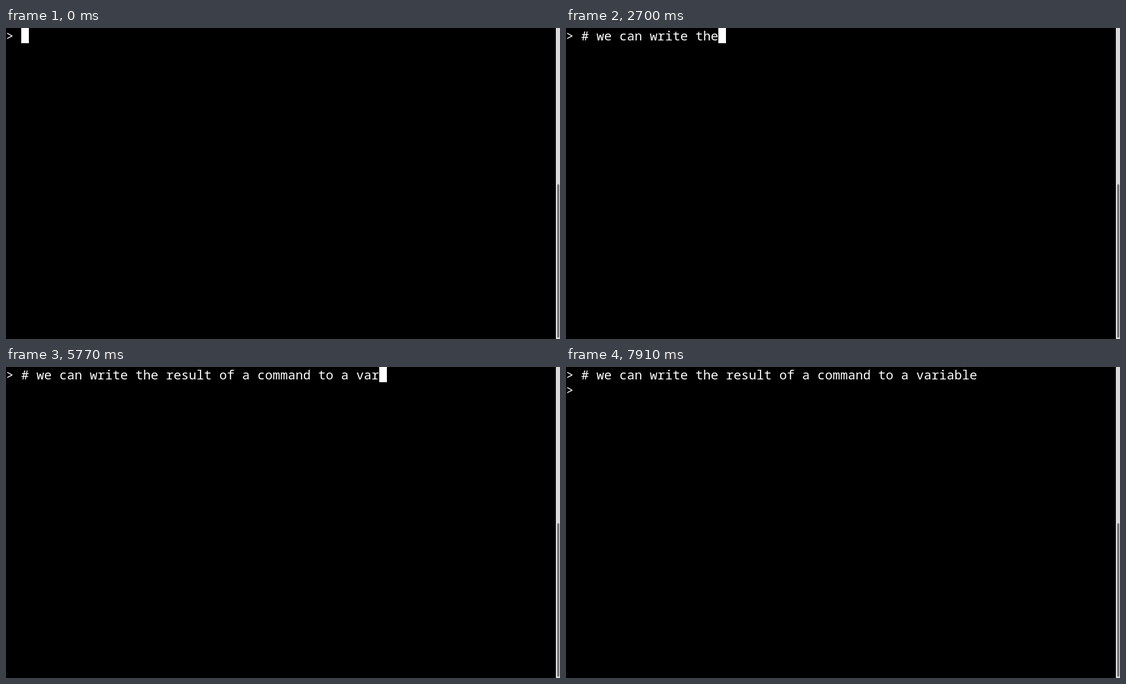
Recreate the animation shown at these times as an HTML page. Size 800 px wide and 450 px high, loop 8 s.

```html
<!DOCTYPE html>
<html lang="en">
<head>
<meta charset="utf-8">
<title>Terminal</title>
<style>
  html, body { margin: 0; width: 100%; height: 100%; overflow: hidden; background: #000; }
  #stage { position: relative; width: 800px; height: 450px; overflow: hidden; background: #000; }
  #screen {
    margin: 0; color: #fff;
    font: 18.333px/22px "Noto Sans Mono", "DejaVu Sans Mono", monospace;
    font-variant-ligatures: none;
  }
  #cursor { position: absolute; width: 11px; height: 22px; background: #fff; }
  #track { position: absolute; left: 794px; top: 0; width: 6px; height: 450px; background: #d9d8da; }
  #thumb { position: absolute; left: 2px; top: 226px; width: 3px; height: 222px; border-radius: 1.5px; background: #747476; }
</style>
</head>
<body>
<div id="stage">
  <pre id="screen"></pre>
  <div id="cursor"></div>
  <div id="track"><div id="thumb"></div></div>
</div>
<script>
  const LOOP = 8000, CELL = 11, ROW = 22;
  const PROMPT = "> ";
  const LINE = PROMPT + "# we can write the result of a command to a variable";
  const ENTER = 7210;
  const BLINK_OFF = [[6600, ENTER], [7860, LOOP]];

  // Typing pace: [time in ms, characters on the line]
  const PACE = [[600, 2], [1465, 11], [2695, 20], [3665, 29], [4895, 41], [5205, 44], [6200, 54]];

  const screen = document.getElementById("screen");
  const cursor = document.getElementById("cursor");

  function typedCount(t) {
    if (t < PACE[0][0]) return PACE[0][1];
    for (let i = 1; i < PACE.length; i++) {
      const [t0, n0] = PACE[i - 1], [t1, n1] = PACE[i];
      if (t < t1) return Math.floor(n0 + (n1 - n0) * (t - t0) / (t1 - t0));
    }
    return LINE.length;
  }

  function render(t) {
    const entered = t >= ENTER;
    const count = typedCount(t);
    const text = LINE.slice(0, count) + (entered ? "\n" + PROMPT : "");
    if (screen.textContent !== text) screen.textContent = text;

    cursor.style.left = (entered ? PROMPT.length : count) * CELL + "px";
    cursor.style.top = (entered ? ROW : 0) + "px";
    const hidden = BLINK_OFF.some(([from, to]) => t >= from && t < to);
    cursor.style.visibility = hidden ? "hidden" : "visible";
  }

  const start = performance.now();
  function tick() {
    render((performance.now() - start) % LOOP);
    requestAnimationFrame(tick);
  }
  tick();
</script>
</body>
</html>
```
